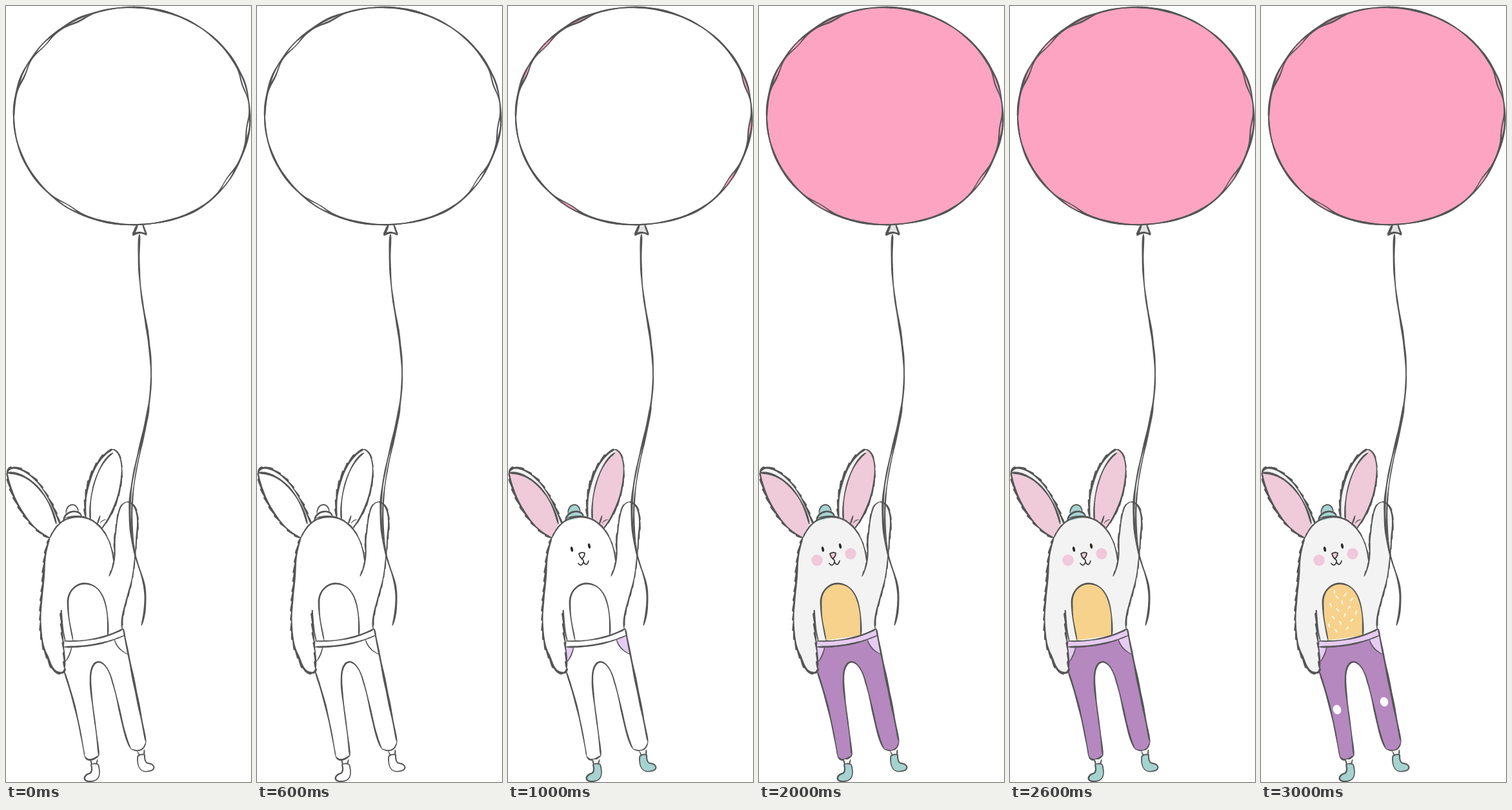
These frames come from a looping animation (380 px wide and 1200 px high, 4 s). An HTML page:

```html
<!DOCTYPE html>
<html lang="en">
<head>
<meta charset="utf-8">
<title>Rabbit with a balloon</title>
<style>
html, body { margin: 0; width: 100%; height: 100%; overflow: hidden; background: #fff; }
svg { display: block; width: 100vw; height: 100vh; }
</style>
</head>
<body>
<svg id="stage" viewBox="0 0 380 1200" preserveAspectRatio="xMidYMid meet"></svg>
<script>
const stage = document.getElementById("stage");
const INK = "#555556", PINK = "#fda4c2", EAR = "#efcad9", FUR = "#f3f3f3",
  MINT = "#a5d3d0", LILAC = "#e6cbf2", PURPLE = "#b588c0", GOLD = "#f6d28c";
const steps = [];

function make(tag, attrs) {
  const el = document.createElementNS("http://www.w3.org/2000/svg", tag);
  for (const k in attrs) el.setAttribute(k, attrs[k]);
  return el;
}

// Adds an element visible during steps first..last.
function add(tag, attrs, first = 0, last = 3) {
  const el = stage.appendChild(make(tag, attrs));
  steps.push({ el, first, last });
}

// Points along a path, about 2 px apart.
function curve(d) {
  const path = make("path", { d }), len = path.getTotalLength(), n = Math.ceil(len / 2);
  return Array.from({ length: n + 1 }, (_, i) => {
    const p = path.getPointAtLength(len * i / n);
    return [p.x, p.y];
  });
}

const trace = pts => "M" + pts.map(p => p.map(v => v.toFixed(1)).join(" ")).join("L") + "Z";
const back = pts => pts.slice().reverse();

function fill(color, parts, first, last) {
  add("path", { d: trace(parts.flat()), fill: color }, first, last);
}

// Pen line of uneven width; fur adds ragged teeth on one side.
function ink(pts, w = 2.2, fur = 0, closed = false) {
  const one = [], two = [], n = pts.length, seed = pts[0][0] + pts[0][1];
  let s = 0;
  pts.forEach(([x, y], i) => {
    const a = pts[i ? i - 1 : closed ? n - 2 : 0];
    const b = pts[i < n - 1 ? i + 1 : closed ? 1 : n - 1];
    const dx = b[0] - a[0], dy = b[1] - a[1], len = Math.hypot(dx, dy) || 1;
    if (i) s += Math.hypot(x - a[0], y - a[1]);
    const end = closed ? 1 : Math.min(1, 0.5 + Math.min(i, n - 1 - i) * 0.2);
    const h = w / 2 * end * (1 + 0.22 * Math.sin(s * 0.045 + seed) + 0.12 * Math.sin(s * 0.14));
    const tooth = fur * ((s + seed) % 15) / 15;
    const u = (h + Math.max(0, tooth)) / len, v = (h + Math.max(0, -tooth)) / len;
    one.push([x + dy * u, y - dx * u]);
    two.push([x - dy * v, y + dx * v]);
  });
  const d = closed ? trace(one) + trace(back(two)) : trace(one.concat(back(two)));
  add("path", { d, fill: INK, "fill-rule": closed ? "evenodd" : "nonzero" });
}

// Balloon outline: an ellipse, fuller at lower right, dented where two strokes part.
const GAPS = [-2.75, -2.42, -2.05, -0.3, 0.12, 0.62, 2.15];
const bump = (a, at, width) => Math.exp(-(((a - at) / width) ** 2));
function ring(dent) {
  return Array.from({ length: 361 }, (_, i) => {
    const a = (i - 180) * Math.PI / 180;
    const r = 1 + 0.025 * bump(a, 0.95, 0.35) -
      dent * GAPS.reduce((sum, g) => sum + bump(a, g, 0.11), 0);
    return [195 + 183 * r * Math.cos(a), 170 + 168 * r * Math.sin(a)];
  });
}
const outer = ring(-0.005), inner = ring(0.02);

const knot = curve("M204 338L197 354Q208 347 218 354L212 338");
const string = curve("M207 353C202 440 218 480 222 525C236 630 198 680 192 768C190 860 216 870 216 915Q216 940 210 958");
const strand = curve("M222 620C212 690 184 750 200 846");

const head = curve("M68 823C78 800 93 790 112 790C142 790 164 820 167 860");
const armIn = curve("M160 882C175 850 165 835 170 815C173 785 176 769 188 767");
const armOut = curve("M188 767C204 768 206 795 203 815C200 850 199 875 192 900C184 930 178 945 180 963");
const flank = curve("M68 823C58 850 60 870 57 900C51 950 53 985 64 1005C70 1022 74 1031 86 1031Q90 1031 91 1024");
const sleeve = curve("M91 1024C92 1000 85 965 86 934");
const side = curve("M86 936Q87 962 92 982");
const belly = curve("M104 981C99 955 96 945 96 920C97 903 110 893 122 893C145 894 160 915 158 973");

const beltTop = curve("M90 982Q143 984 182 963");
const beltLow = curve("M90 991Q143 992 184 973");
const pocketL = curve("M102 990Q100 1003 92 1014");
const pocketR = curve("M168 979Q172 995 190 1003");
const legL = curve("M90 1028C104 1070 112 1100 122 1160");
const cuffL = curve("M122 1160Q128 1172 144 1159");
const inseam = curve("M144 1159C140 1115 130 1060 131 1040C131 1005 155 1005 165 1045C176 1080 182 1130 194 1149");
const cuffR = curve("M194 1149Q213 1157 217 1138");
const legR = curve("M217 1138C209 1095 193 1020 182 964");

const earL = curve("M68 822C35 810 5 755 2 722");
const earLTop = curve("M2 722C6 704 38 720 55 744C68 763 76 780 83 800");
const earLIn = curve("M2 722C35 720 68 755 78 801");
const earR = curve("M124 792C118 745 140 695 166 686");
const earROut = curve("M166 686C188 690 184 765 148 808");
const earRIn = curve("M131 795C127 755 143 705 166 691");

const pom = curve("M93 785C93 767 112 767 112 783");
const brim = curve("M89 797C90 778 117 778 117 790");

// One foot, mirrored and turned for the other side.
function foot(x, y, flip, turn) {
  const c = Math.cos(turn), s = Math.sin(turn);
  const place = pts => pts.map(([u, v]) => [x + flip * u * c - v * s, y + flip * u * s + v * c]);
  const ankle = [curve("M-6 -7L-4 1"), curve("M5 -7L3 1")].map(place);
  const shoe = place(curve("M-5 1Q1 -2 6 1C10 14 9 27 -6 27C-18 28 -18 18 -8 15Q-2 13 -5 1"));
  fill(FUR, [ankle[0], back(ankle[1])], 1);
  fill(MINT, [shoe], 1);
  ankle.forEach(line => ink(line, 2));
  ink(shoe, 2, 0, true);
}

// Colours
const balloon = trace(outer) + trace(inner);
add("path", { d: balloon, fill: "#f29eb7", "fill-rule": "evenodd" }, 1, 1);
add("path", { d: balloon, fill: PINK }, 2);
fill("#e2e2e2", [knot], 1);
fill(FUR, [earL, earLTop], 1);
fill(FUR, [earR, earROut], 1);
const body = [head, armIn, armOut, back(beltTop), back(flank)];
fill("#fff", body, 1, 1);
fill(FUR, body, 2);
fill(EAR, [earL, back(back(earLIn))], 1);
fill(EAR, [earRIn, earROut], 1);
fill(MINT, [pom], 1);
fill(MINT, [brim], 1);
fill(GOLD, [belly], 2);
fill(PURPLE, [beltLow, back(legR), back(cuffR), back(inseam), back(cuffL), back(legL)], 2);
fill(LILAC, [beltTop, back(beltLow)], 2);
fill(LILAC, [beltLow.slice(0, 7), pocketL], 1);
fill(LILAC, [pocketR, back(beltLow).slice(0, 9)], 1);
for (const [cx, cy] of [[90, 857], [142, 847]]) add("circle", { cx, cy, r: 8.7, fill: "#f0c9da" }, 2);
add("ellipse", { cx: 114.5, cy: 849.5, rx: 4, ry: 4.5, fill: EAR }, 2);

// Flecks spread down the belly by the golden ratio
for (let i = 0; i < 16; i++) {
  const x = 127 + (i * 0.618 % 1 - 0.5) * Math.min(46, 26 + i * 4), y = 906 + i * 4;
  add("ellipse", { rx: 1.2, ry: 3.6, fill: "#fff6e4",
    transform: `translate(${x} ${y}) rotate(${45 * Math.sin(i * 2.4)})` }, 3);
}
for (const [x, y] of [[118, 1088], [191, 1076]])
  add("ellipse", { rx: 6.2, ry: 7.4, fill: "#fff", transform: `translate(${x} ${y}) rotate(-17)` }, 3);

// Lines
ink(outer, 2.6, 0, true);
ink(inner, 2.1, 0, true);
ink(knot, 3);
ink(string, 2.7);
ink(strand, 2);
ink(earL, 2.3, 2);
ink(earLTop, 2.2, 1.8);
ink(earLIn, 2.8);
ink(earR, 2.6, 1.8);
ink(earROut, 2.2, 0.8);
ink(earRIn);
ink(curve("M141 803L146 788"), 1.8);
ink(curve("M146 800Q149 795 155 794"), 1.5);
ink(head, 2, 0.6);
ink(armIn, 1.8, 0.8);
ink(armOut, 1.9, 0.9);
ink(flank, 2.4, -2);
ink(sleeve, 2.3, 1.8);
ink(curve("M91 792Q103 788 116 789"), 1.7);
ink(legR, 3);
[side, belly, pom, brim, beltTop, beltLow, legL, inseam, cuffL, cuffR].forEach(line => ink(line));
[pocketL, pocketR, curve("M90 982L89 991"), curve("M182 963L184 973")].forEach(line => ink(line, 1.8));
foot(137, 1172, 1, 0);
foot(210, 1158, -1, -0.2);

// Face
for (const [x, y] of [[99, 840], [126, 835]])
  add("ellipse", { rx: 1.9, ry: 4, fill: "#29292a", transform: `translate(${x} ${y}) rotate(-12)` }, 1);
add("path", {
  d: "M110 847Q114 844 119 846Q119 851 114.5 855Q111 852 110 847M114.5 855Q118 857 117 860Q114 868 109 862M117 860Q122 868 125 858",
  fill: "none", stroke: "#333334", "stroke-width": 1.7, "stroke-linecap": "round"
}, 1);

function draw() {
  const step = Math.floor(performance.now() % 4000 / 1000);
  for (const { el, first, last } of steps)
    el.style.display = step >= first && step <= last ? "" : "none";
  requestAnimationFrame(draw);
}
draw();
</script>
</body>
</html>
```
